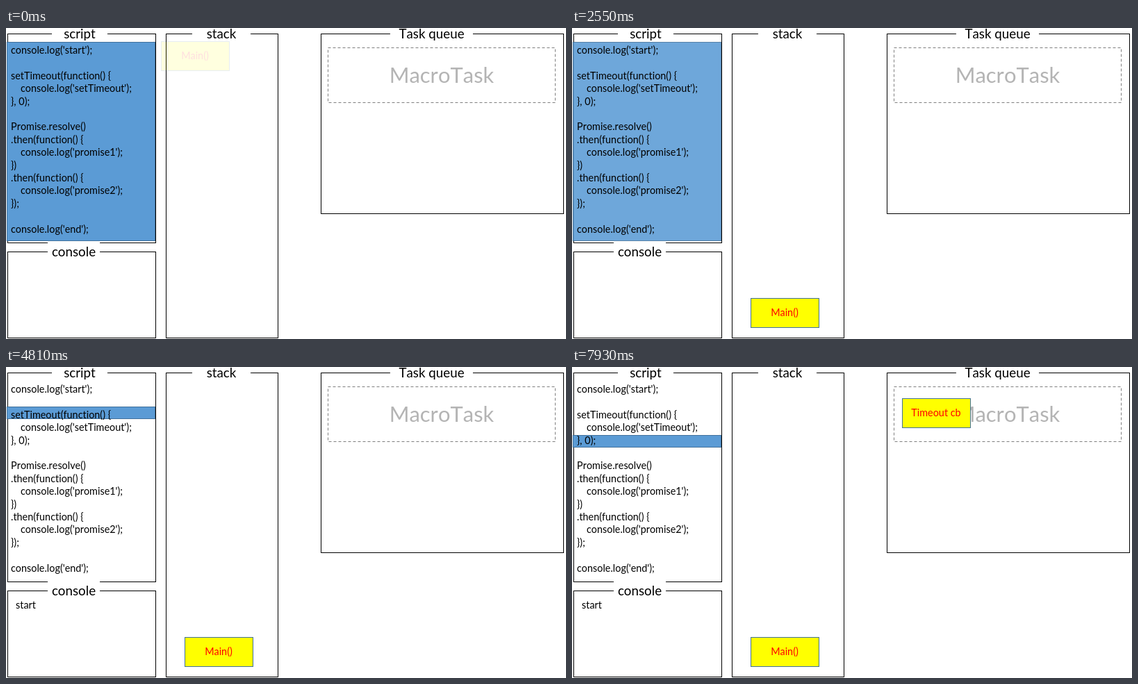
An HTML page that plays this animation: 806x448 px, repeating every 8 s.

```html
<!DOCTYPE html>
<html lang="en">
<head>
<meta charset="utf-8">
<title>Event loop</title>
<style>
  html, body { margin: 0; width: 100%; height: 100%; overflow: hidden; background: #fff; }
  svg {
    display: block; width: 806px; height: 448px;
    font: 14.4px Lato, sans-serif; font-kerning: none; font-variant-ligatures: none;
  }
  .panel { fill: none; stroke: #000; }
  .gap { fill: #fff; }
  .label { font-size: 18.8px; text-anchor: middle; }
  .slot { fill: none; stroke: #7f7f7f; stroke-dasharray: 4 3; }
  .queue { font-size: 31px; fill: #b4b4b4; text-anchor: middle; }
  .mark { fill: #5b9bd5; stroke: #41719c; }
  .task rect { fill: #ff0; stroke: #41719c; }
  .task text { fill: #f00; text-anchor: middle; }
</style>
</head>
<body>
<svg viewBox="0 0 806 448">
  <g id="panels"></g>
  <rect class="slot" x="463.5" y="28.5" width="327" height="79"/>
  <text class="queue" x="627" y="79">MacroTask</text>
  <rect id="block" class="mark" x="1.5" y="20.5" width="213" height="286"/>
  <rect id="line" class="mark" x="1.5" y=".5" width="213" height="17"/>
  <g id="code"></g>
  <text id="output" x="14" y="348">start</text>
  <g id="main" class="task">
    <rect x=".5" y=".5" width="98" height="42"/>
    <text x="49" y="26">Main()</text>
  </g>
  <g id="timeout" class="task">
    <rect x=".5" y=".5" width="98" height="42"/>
    <text x="49" y="26">Timeout cb</text>
  </g>
</svg>
<script>
const LOOP = 8000, STEP = 141.4;
const $ = id => document.getElementById(id);

function add(parent, name, attrs, text = '') {
  const node = document.createElementNS('http://www.w3.org/2000/svg', name);
  for (const key in attrs) node.setAttribute(key, attrs[key]);
  node.textContent = text;
  parent.append(node);
  return node;
}

// The label's white box hides the frame line behind it, and any line just above.
function panel(label, x, y, width, height, center, gap) {
  const parent = $('panels');
  add(parent, 'rect', { class: 'panel', x, y, width, height });
  add(parent, 'rect', { class: 'gap', x: center - gap / 2, y: y - 13.5, width: gap, height: 20 });
  add(parent, 'text', { class: 'label', x: center, y: y + 6 }, label);
}
panel('script', 2.5, 8.5, 213, 301, 106, 80);
panel('console', 2.5, 322.5, 213, 124, 97.5, 75);
panel('stack', 230.5, 8.5, 161, 438, 310, 84);
panel('Task queue', 453.5, 8.5, 349, 259, 612.5, 119);

const source = `console.log('start');

setTimeout(function() {
  console.log('setTimeout');
}, 0);

Promise.resolve()
.then(function() {
  console.log('promise1');
})
.then(function() {
  console.log('promise2');
});

console.log('end');`;
source.split('\n').forEach((row, i) => {
  const x = row.startsWith(' ') ? 21 : 7;
  add($('code'), 'text', { x, y: Math.round(37 + i * 18.4) }, row.trim());
});

const progress = (t, start, duration) => Math.min(1, Math.max(0, (t - start) / duration));
const fade = (t, start) => progress(t, start, 500);

// Constant acceleration, then constant deceleration.
function glide(t, start, duration) {
  const u = progress(t, start, duration);
  return u < .5 ? 2 * u * u : 1 - 2 * (1 - u) ** 2;
}

function route(d) {
  const path = document.createElementNS('http://www.w3.org/2000/svg', 'path');
  path.setAttribute('d', d);
  const length = path.getTotalLength();
  return part => path.getPointAtLength(part * length);
}
const intoStack = route('M223 19C243 24 251 59 252 94S256 139 256 181L257 389');
const intoQueue = route('M224 61C314 61 384 61 423 59C446 57 462 52 475 45');

function place(id, x, y, opacity) {
  $(id).setAttribute('transform', `translate(${Math.round(x)} ${Math.round(y)})`);
  $(id).setAttribute('opacity', opacity);
}

function draw(now) {
  const t = Math.floor(now % LOOP / STEP) * STEP;
  const stack = intoStack(glide(t, 453, 2000));
  const queue = intoQueue(glide(t, 5640, 1700));
  const lineY = 24 + 38 * glide(t, 4240, 760) + 36 * glide(t, 7330, 620);

  place('main', stack.x, stack.y, fade(t, -60));
  place('timeout', queue.x, queue.y, fade(t, 5040));
  place('line', 0, lineY, fade(t, 3065));
  $('block').setAttribute('opacity', 1 - fade(t, 2485));
  $('output').setAttribute('opacity', fade(t, 3640));
  requestAnimationFrame(draw);
}
draw(0);
</script>
</body>
</html>
```
